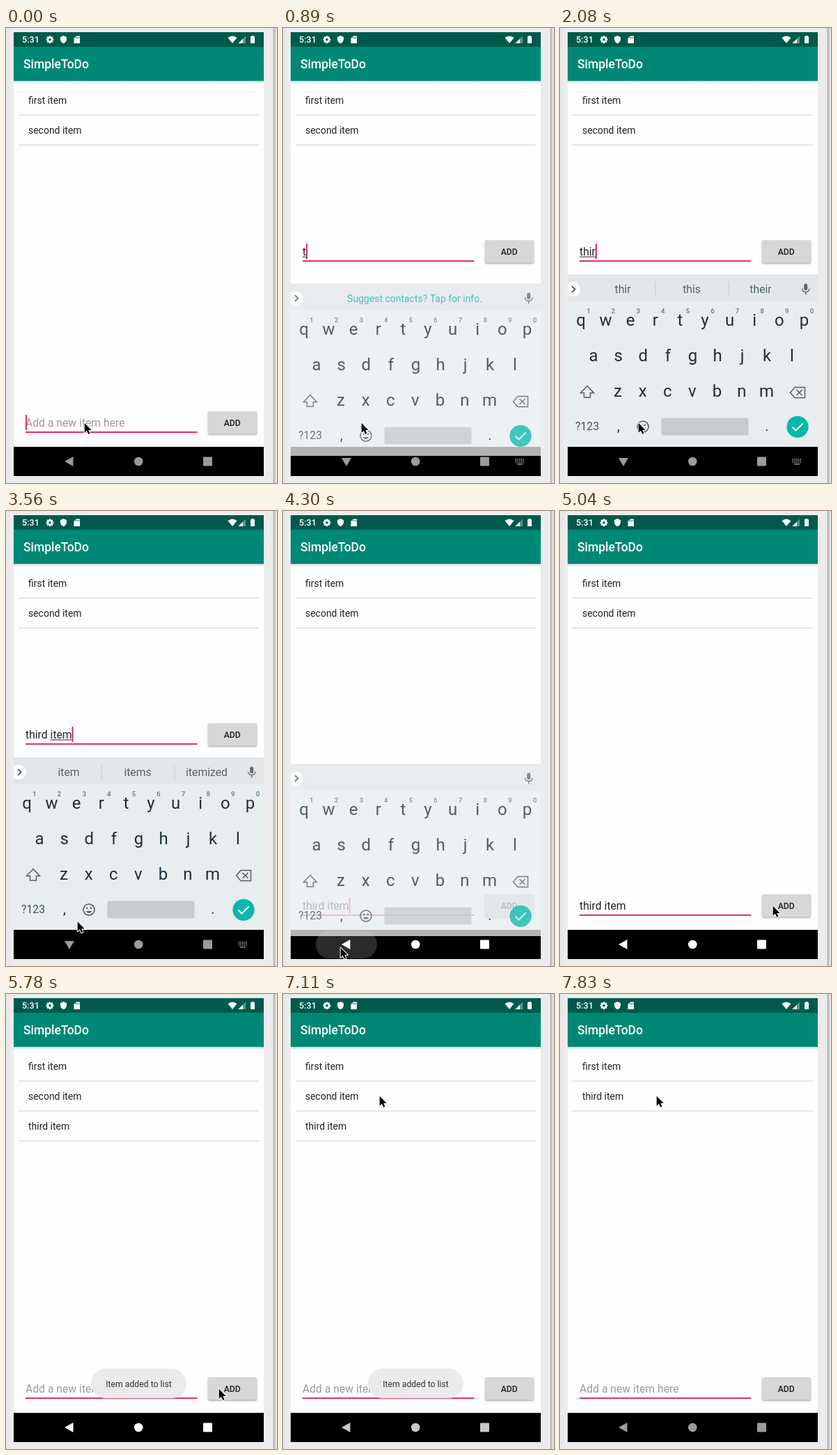
An HTML page with a canvas that plays this animation: 389x654 px, repeating every 8000 ms.

```html
<!DOCTYPE html>
<html lang="en">
<head>
<meta charset="utf-8">
<title>To-do list</title>
<style>
html, body { margin: 0; width: 100%; height: 100%; overflow: hidden; background: #ececed; }
canvas { display: block; width: 389px; height: 654px; }
</style>
</head>
<body>
<canvas id="stage"></canvas>
<script>
const W = 389, H = 654, LOOP = 8000, TICK = 148;
const canvas = document.getElementById('stage');
const ctx = canvas.getContext('2d');
const ratio = window.devicePixelRatio || 1;
canvas.width = W * ratio;
canvas.height = H * ratio;

const clamp = v => Math.max(0, Math.min(1, v));

// Linear interpolation through [tick, ...values] keys.
function along(keys, tick) {
  if (tick <= keys[0][0]) return keys[0].slice(1);
  for (let i = 1; i < keys.length; i++) {
    const a = keys[i - 1], b = keys[i];
    if (tick <= b[0]) {
      const k = (tick - a[0]) / (b[0] - a[0]);
      return a.slice(1).map((v, j) => v + (b[j + 1] - v) * k);
    }
  }
  return keys[keys.length - 1].slice(1);
}

// Latest [tick, value] entry that has started.
function latest(steps, tick) {
  let found = steps[0];
  for (const s of steps) if (s[0] <= tick) found = s;
  return found;
}

const TYPED = [
  [-1, ''], [5, ''], [6, 't'], [7, 'th'], [13, 'thi'], [14, 'thir'], [15, 'third'],
  [16, 'third '], [19, 'third i'], [20, 'third ite'], [21, 'third item']
];
const HINTS = [
  [0, 'Suggest contacts? Tap for info.'], [8, 'the|this|that'], [13, 'thi|this|think'],
  [14, 'thir|this|their'], [15, 'third|thirds|their'], [16, 'one|time|party'],
  [19, 'is|in|I'], [20, 'ite|item|items'], [21, 'item|items|itemized'], [29, '']
];
const POINTER = [
  [23, 112, 567], [25, 92, 612], [26, 84, 636], [27, 82, 627], [29, 82, 627],
  [30, 112, 606], [31, 180, 582], [32, 252, 571], [34, 305, 567], [40, 305, 567],
  [41, 292, 545], [43, 208, 300], [45, 147, 160], [46, 138, 146]
];
const KEYBOARD = [
  [4, 40, 0], [5, 28, .35], [6, 13, .76], [7, 4, .95], [8, 0, 1], [28, 0, 1],
  [29, 9, .76], [30, 26, .25], [31, 40, 0]
];
const TOAST = [[36, 0], [38, 1], [50, 1], [52, 0]];
const ADDED = 36, REMOVED = 52;

function rect(x, y, w, h, color) {
  ctx.fillStyle = color;
  ctx.fillRect(x, y, w, h);
}

function round(x, y, w, h, r, color) {
  ctx.beginPath();
  ctx.roundRect(x, y, w, h, r);
  ctx.fillStyle = color;
  ctx.fill();
}

function disc(x, y, r, color) {
  ctx.beginPath();
  ctx.arc(x, y, r, 0, Math.PI * 2);
  ctx.fillStyle = color;
  ctx.fill();
}

function text(str, x, y, size, color, align = 'left', weight = 400) {
  ctx.font = `${weight} ${size}px Roboto, sans-serif`;
  ctx.textAlign = align;
  ctx.fillStyle = color;
  ctx.fillText(str, x, y);
}

function fillPath(d, color) {
  ctx.fillStyle = color;
  ctx.fill(new Path2D(d));
}

function strokePath(d, color, width = 1.5) {
  ctx.strokeStyle = color;
  ctx.lineWidth = width;
  ctx.stroke(new Path2D(d));
}

function drawSurround() {
  rect(0, 0, W, H, '#ececed');
  rect(0, 0, 5, H, '#e8e8ea');
  rect(383, 0, 1, H, '#dddadc');
  rect(384, 0, 1.5, H, '#aaa3a6');
  rect(385.5, 0, 1.5, H, '#d3cfd1');
  rect(387, 0, 2, H, '#e6e4e5');
}

function drawStatusBar() {
  rect(11, 6, 359, 21, '#005a4c');
  text('5:31', 23, 21, 12.6, '#fff', 'left', 500);

  ctx.save();
  ctx.translate(63, 16.7);
  for (let i = 0; i < 8; i++) {
    rect(-1.2, -5.4, 2.4, 3, '#fff');
    ctx.rotate(Math.PI / 4);
  }
  disc(0, 0, 4.1, '#fff');
  disc(0, 0, 1.8, '#005a4c');
  ctx.restore();

  fillPath('M82.5 11 L87 13 V16.5 Q86.500 20.500 82.500 22.300 Q78.500 20.500 78 16.500 V13 Z', '#fff');
  fillPath('M101 11.500 H106 V22 H97.500 V15 Z', '#fff');
  for (const x of [100, 102, 104]) rect(x, 13, .9, 2, '#005a4c');

  fillPath('M318.500 14 Q325 9 331.500 14 L325 22 Z', '#fff');
  fillPath('M344 11.500 V22 H333.500 Z', 'rgba(255,255,255,.35)');
  fillPath('M340 15.500 V22 H333.500 Z', '#fff');
  rect(352.5, 11, 3, 2, '#fff');
  round(351, 12, 6, 10, .8, '#fff');
}

function drawAppBar() {
  rect(11, 27, 359, 49, '#008876');
  text('SimpleToDo', 25, 58, 17.47, '#fff', 'left', 500);
  const shade = ctx.createLinearGradient(0, 76, 0, 80);
  shade.addColorStop(0, '#d4d4d4');
  shade.addColorStop(1, '#fbfbfb');
  rect(11, 76, 359, 4, shade);
}

function drawList(tick) {
  const items = ['first item'];
  if (tick < REMOVED) items.push('second item');
  if (tick >= ADDED) items.push('third item');

  if (tick >= 49 && tick <= REMOVED) {
    ctx.save();
    ctx.beginPath();
    ctx.rect(18, 126, 345, 41);
    ctx.clip();
    const strength = tick === REMOVED ? .04 : .09;
    rect(18, 126, 345, 41, `rgba(0,0,0,${strength / 2})`);
    disc(139, 147, 60 + (tick - 49) * 80, `rgba(0,0,0,${strength})`);
    ctx.restore();
  }
  items.forEach((item, i) => {
    text(item, 32, 109 + 43 * i, 13.98, '#212121');
    rect(18, 124.4 + 43 * i, 345, 1.5, '#dedede');
  });
}

function drawForm(tick) {
  const up = tick >= 5 && tick < 29;
  const [edited, value] = latest(TYPED, tick);
  const content = tick >= ADDED ? '' : value;
  ctx.save();
  ctx.translate(0, up ? -246 : 0);

  text(content || 'Add a new item here', 28, 573, 15.72, content ? '#212121' : '#9b9b9b');
  if (content && up) {
    const start = content.startsWith('third ') ? ctx.measureText('third ').width : 0;
    const end = ctx.measureText(content).width;
    if (end > start) rect(28 + start, 574.5, end - start, 1, '#212121');
  }
  rect(28, 580, 246.5, 1.8, '#d81b60');
  if ((tick - edited) * TICK % 1000 < 500) {
    rect(28 + ctx.measureText(content).width, 556, 1.8, 22, '#d81b60');
  }

  ctx.shadowColor = 'rgba(0,0,0,.35)';
  ctx.shadowBlur = 2.5 * ratio;
  ctx.shadowOffsetY = 1.2 * ratio;
  round(290, 551, 70, 32.5, 1.8, '#d6d7d7');
  ctx.shadowColor = 'transparent';
  if (tick >= 35 && tick <= 37) round(290, 551, 70, 32.5, 1.8, 'rgba(0,0,0,.1)');
  text('ADD', 324.7, 572, 12.23, '#212121', 'center', 500);
  ctx.restore();
}

function drawNavBar(tick) {
  rect(11, 602, 359, 42, '#000');
  const press = tick >= 28 && tick <= 30 ? [.5, 1, .45][tick - 28] : 0;
  if (press) round(47, 603, 88, 40, 20, `rgba(255,255,255,${.17 * press})`);
}

function drawNavIcons(tick) {
  const level = tick < 28 ? 155 : Math.round(255 - 100 * clamp((tick - 42) / 11));
  const color = `rgb(${level},${level},${level})`;
  const open = tick >= 5 && tick < 29;
  fillPath(open ? 'M84 618 H98 L91 630 Z' : 'M84 623 L96.500 616 V630 Z', color);
  disc(190.3, 623, 6.3, color);
  round(283, 616.5, 13, 13, 1, color);
  if (open) {
    for (let row = 0; row < 3; row++)
      for (let col = 0; col < 5; col++)
        rect(333.5 + col * 2.7, 619 + row * 2.4, 1.6, 1.4, color);
    rect(336, 626.3, 8, 1.3, color);
  }
}

function drawSuggestions(tick) {
  const words = latest(HINTS, tick)[1];
  if (words.includes('|')) {
    words.split('|').forEach((w, i) => text(w, 90 + 99 * i, 381, 15.72, '#53636a', 'center'));
    rect(136.5, 365, 1, 21, '#c9ced1');
    rect(241.5, 365, 1, 21, '#c9ced1');
  } else {
    text(words, 189, 381, 13.98, '#12b5a6', 'center');
  }
  ctx.save();
  ctx.beginPath();
  ctx.rect(11, 350, 40, 50);
  ctx.clip();
  disc(18.5, 375.5, 10.5, '#fff');
  ctx.restore();
  strokePath('M17 371 L21.500 375.500 L17 380', '#37474f', 1.7);
  round(350.2, 367.5, 5, 9.5, 2.5, '#5b6a71');
  strokePath('M347.500 374.500 Q348 379.500 352.700 379.500 Q357.500 379.500 358 374.500 M352.700 379.500 V383.500', '#5b6a71', 1.4);
}

function drawKeyboard(tick) {
  const [shift, alpha] = along(KEYBOARD, tick);
  if (!alpha) return;
  const ink = '#1c313a', soft = '#4f6068';

  // Flattened on its own layer so that the panel fades as one piece.
  ctx.save();
  ctx.beginPath();
  ctx.rect(11, 340, 359, 304);
  ctx.clip();
  ctx.globalAlpha = alpha;
  ctx.translate(0, shift);
  rect(11, 354.5, 359, 1.5, '#dde1e3');
  rect(11, 356, 359, 37, '#e3e7ea');
  rect(11, 393, 359, 209, '#e8edf0');
  drawSuggestions(tick);

  const rows = [['qwertyuiop', 30, 428], ['asdfghjkl', 48, 479], ['zxcvbnm', 83, 530]];
  for (const [keys, x, y] of rows) {
    [...keys].forEach((key, i) => text(key, x + 35.6 * i, y, 24, ink, 'center'));
  }
  [...'1234567890'].forEach((d, i) => text(d, 41 + 35.6 * i, 410, 9.6, '#66757c', 'center', 500));

  strokePath('M39 514.500 L48.500 524.500 H43.500 V531 H34.500 V524.500 H29.500 Z', soft);
  strokePath('M337 516.500 H351.500 V531.500 H337 L330.500 524 Z M339.500 520 L347.500 528 M347.500 520 L339.500 528', soft);

  text('?123', 39, 578, 15.72, '#40525a', 'center');
  text(',', 84, 579, 20, ink, 'center');
  text('.', 297, 579, 20, ink, 'center');
  ctx.beginPath();
  ctx.arc(119, 573, 8, 0, Math.PI * 2);
  ctx.strokeStyle = soft;
  ctx.lineWidth = 1.6;
  ctx.stroke();
  disc(116.2, 570.8, 1.3, soft);
  disc(121.8, 570.8, 1.3, soft);
  fillPath('M114.500 575 H123.500 Q119 581 114.500 575 Z', soft);
  round(145.5, 560.5, 125, 25, 2.5, '#c7ccd0');
  disc(341, 573.3, 15.6, '#08b8aa');
  strokePath('M333.500 573.500 L338.500 578.500 L348.500 568.500', '#fff', 2);
  ctx.restore();
}

function drawToast(tick) {
  const [alpha] = along(TOAST, tick);
  if (!alpha) return;
  ctx.save();
  ctx.globalAlpha = alpha;
  round(122, 538.5, 137, 42.5, 21.2, 'rgba(234,234,234,.95)');
  text('Item added to list', 190.5, 565, 12.23, '#333', 'center');
  ctx.restore();
}

function drawPointer(tick) {
  const [x, y] = along(POINTER, tick);
  ctx.save();
  ctx.translate(x + .7, y + .8);
  ctx.lineJoin = 'round';
  const arrow = 'M0 0 V14 L3.200 11 L5.500 16 L7.800 15 L5.600 10.200 H10 Z';
  strokePath(arrow, '#fff', 2);
  fillPath(arrow, '#000');
  ctx.restore();
}

function draw(ms) {
  const tick = Math.min(53, Math.floor((ms + 15) / TICK));
  ctx.setTransform(ratio, 0, 0, ratio, 0, 0);
  drawSurround();
  rect(11, 76, 359, 526, '#fefefe');
  drawStatusBar();
  drawAppBar();
  drawList(tick);
  drawForm(tick);
  drawNavBar(tick);
  drawKeyboard(tick);
  drawNavIcons(tick);
  drawToast(tick);
  drawPointer(tick);
}

const begin = performance.now();
function frame() {
  draw((performance.now() - begin) % LOOP);
  requestAnimationFrame(frame);
}
frame();
</script>
</body>
</html>
```
